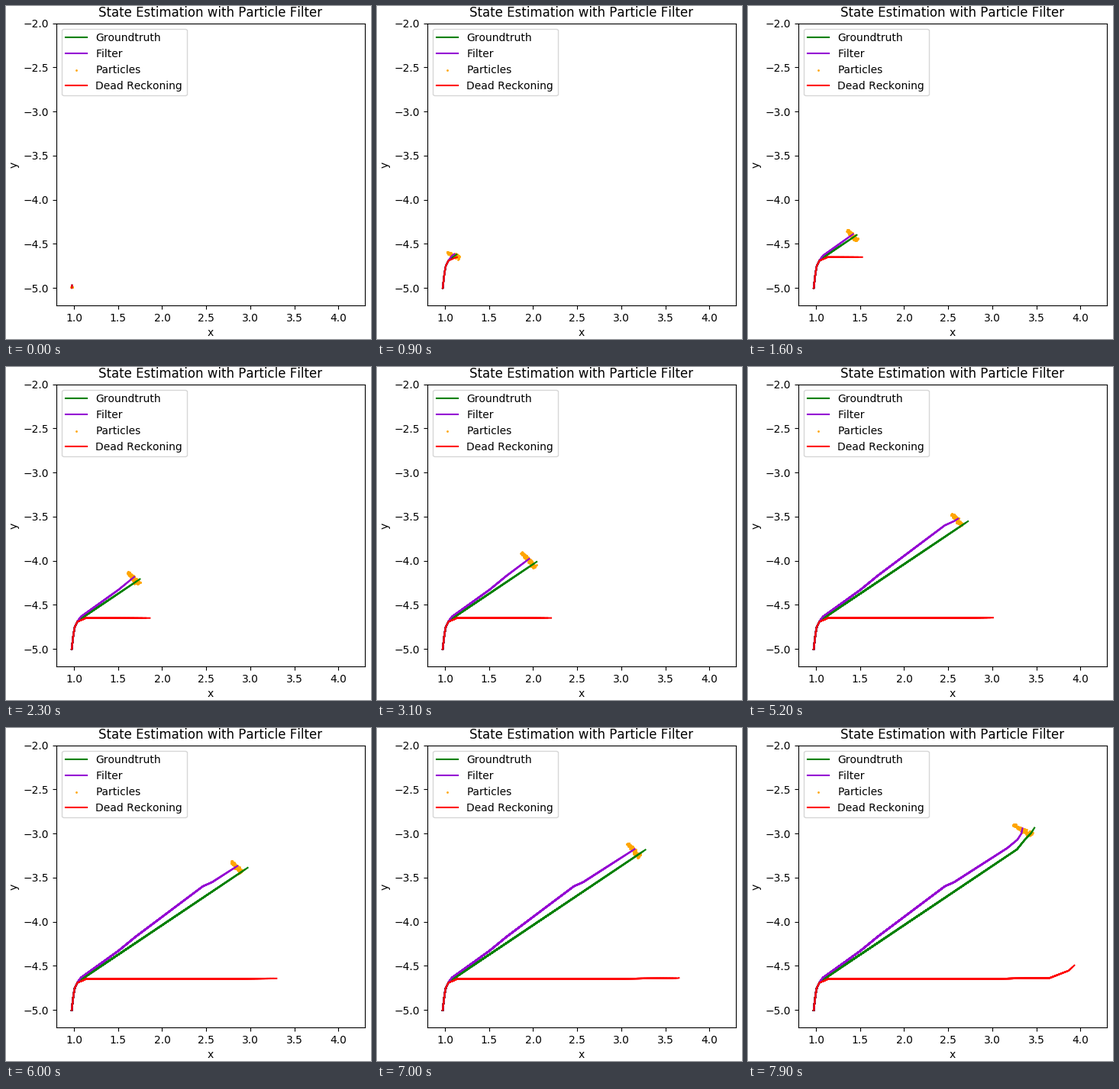
Write a matplotlib script that moves like this. It is 478x436 px and loops after 8 s.

```python
import numpy as np
import matplotlib.pyplot as plt
from matplotlib.animation import FuncAnimation

W, H, DPI = 478, 436, 100
FRAMES, STEP = 80, 100
SCALE = 115.5  # pixels per data unit

STEM = [(0.975, -5.0), (0.995, -4.83), (1.01, -4.75), (1.04, -4.69)]
TRUTH = STEM + [(1.09, -4.65), (3.28, -3.18), (3.365, -3.075),
                (3.44, -2.995), (3.478, -2.935)]
FILTER = STEM + [(1.08, -4.635), (1.505, -4.33), (1.7, -4.17),
                 (2.46, -3.6), (2.57, -3.55), (3.17, -3.165),
                 (3.285, -3.07), (3.33, -3.0), (3.342, -2.94)]
RECKON = STEM + [(1.13, -4.652), (2.8, -4.648), (3.645, -4.64),
                 (3.865, -4.555), (3.93, -4.495)]


def progress(n):
    """Share of the route covered: a quick start settling to a steady pace."""
    t = max(n * STEP / 1000 - 0.3, 0)
    return 0.009 + 0.1072 * t + 0.178 * (1 - np.exp(-t / 1.55))


def trail(path, p):
    """Part of the path covered at progress p."""
    xy = np.array(path)
    dist = np.append(0, np.cumsum(np.hypot(*np.diff(xy, axis=0).T)))
    share = dist / dist[-1]
    tip = [np.interp(p, share, xy[:, k]) for k in (0, 1)]
    return np.vstack([xy[share < p], tip])


def cloud(n):
    """Particles spread across the heading, just behind the filter's tip."""
    p = progress(n)
    rng = np.random.default_rng(max(n, 3))
    dx, dy = trail(TRUTH, p)[-1] - trail(TRUTH, max(p - 0.09, 0))[-1]
    tilt = np.arctan2(dy, dx) - np.radians(82)
    pulse = 0.1 + 0.02 * np.cos(2 * np.pi * (n - 36) / 44)
    grow = min(1, p / 0.15)
    u = rng.uniform(-1, 1, 120)
    v = np.clip(rng.normal(0, 0.5, u.size), -1, 1)
    along = grow * pulse * u
    across = grow * 0.024 * (1 + 0.4 * u) * v
    c, s = np.cos(tilt), np.sin(tilt)
    offset = np.column_stack([c * along - s * across, s * along + c * across])
    return trail(FILTER, max(p - 0.006, 0.001))[-1] + offset


plt.rcParams["text.kerning_factor"] = 6
fig = plt.figure(figsize=(W / DPI, H / DPI), dpi=DPI)
ax = fig.add_axes([65.875 / W, 43.8 / H, 3.5 * SCALE / W, 3.2 * SCALE / H])
ax.set(xlim=(0.8, 4.3), ylim=(-5.2, -2.0), xlabel="x", ylabel="y",
       title="State Estimation with Particle Filter")

dots = ax.scatter([], [], s=1, c="orange")

# Trails pile up frame after frame, which hardens their edges
layers = []
for n in range(FRAMES):
    layer = []
    for path, color in ((TRUTH, "green"), (FILTER, "darkviolet"),
                        (RECKON, "red")):
        layer += ax.plot(*trail(path, progress(n)).T, color=color)
    layers.append(layer)

truth, estimate, reckon = layers[0]
ax.legend([truth, estimate, dots, reckon],
          ["Groundtruth", "Filter", "Particles", "Dead Reckoning"],
          loc="upper left")


def draw(n):
    dots.set_offsets(cloud(n))
    for i, layer in enumerate(layers):
        for line in layer:
            line.set_visible(i <= n)
    return [dots]


anim = FuncAnimation(fig, draw, frames=FRAMES, interval=STEP,
                     repeat=True, repeat_delay=0)
plt.show()
```
